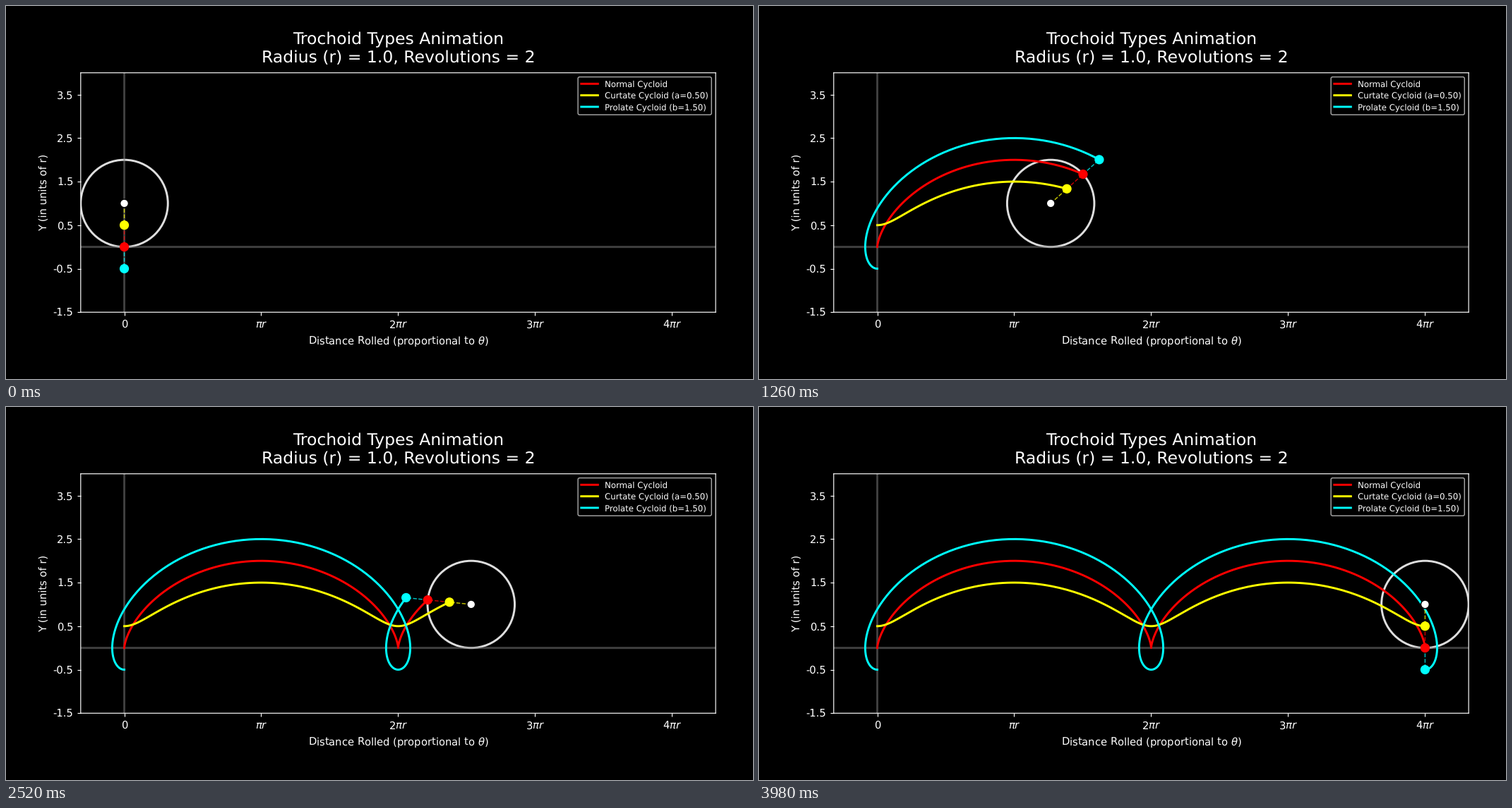
Write a matplotlib script that moves like this. It is 1058 by 529 pixels and loops after 4 s.

```python
import numpy as np
import matplotlib.pyplot as plt
from matplotlib.animation import FuncAnimation
from matplotlib.patches import Circle

FRAMES, INTERVAL = 200, 20
R, TURNS = 1.0, 2
CURTATE, PROLATE = 0.5, 1.5
END = 2 * np.pi * R * TURNS
X_MIN, X_MAX, Y_MIN, Y_MAX = -R, END + R, -1.5, 4.0
FIG_W, FIG_H, DPI = 10, 5, 105.8

plt.style.use("dark_background")
# Smooth, unsnapped lines and unhinted text
plt.rcParams.update({"path.snap": False, "text.hinting": "none"})
fig = plt.figure(figsize=(FIG_W, FIG_H), dpi=DPI)

# Equal scale on both axes, centred vertically
width = 0.85
height = width * FIG_W / FIG_H * (Y_MAX - Y_MIN) / (X_MAX - X_MIN)
ax = fig.add_axes([0.1, 0.5 - height / 2, width, height])
ax.set_xlim(X_MIN, X_MAX)
ax.set_ylim(Y_MIN, Y_MAX)

ax.set_title(f"Trochoid Types Animation\nRadius (r) = {R}, Revolutions = {TURNS}",
             fontsize=16, pad=10)
ax.set_xlabel(r"Distance Rolled (proportional to $\theta$)")
ax.set_ylabel("Y (in units of r)")
ax.set_xticks(np.arange(5) * np.pi * R,
              ["0", r"$\pi r$", r"$2\pi r$", r"$3\pi r$", r"$4\pi r$"])
y_ticks = np.arange(Y_MIN, Y_MAX, 1)
ax.set_yticks(y_ticks, [f"{y:.1f}" for y in y_ticks])

ax.axhline(0, color="gray", lw=2, alpha=0.5)
ax.axvline(0, color="gray", lw=2, alpha=0.5)

wheel = Circle((0, R), R, fill=False, ec="0.87", lw=2)
ax.add_patch(wheel)

theta = np.linspace(0, 2 * np.pi * TURNS, FRAMES)


def trochoid(arm):
    return R * theta - arm * np.sin(theta), R - arm * np.cos(theta)


KINDS = [
    (R, "red", "Normal Cycloid"),
    (CURTATE, "yellow", f"Curtate Cycloid (a={CURTATE:.2f})"),
    (PROLATE, "cyan", f"Prolate Cycloid (b={PROLATE:.2f})"),
]
paths = [trochoid(arm) for arm, _, _ in KINDS]
trails = [ax.plot([], [], color=c, lw=2, label=name)[0] for _, c, name in KINDS]

# Spokes run outwards: centre, curtate, normal, prolate
stops = np.array([trochoid(arm) for arm in (0, CURTATE, R, PROLATE)])
spokes = [ax.plot([], [], "--", color=c, lw=1, alpha=0.75)[0]
          for c in ("yellow", "red", "cyan")]
dots = ax.scatter(*stops[:, :, 0].T, s=64, linewidths=1, zorder=3,
                  c=["white", "yellow", "red", "cyan"],
                  edgecolors=["black", "yellow", "red", "cyan"])

legend = ax.legend(loc="upper right", fontsize=8, labelspacing=0.4)
legend.get_frame().set_snap(False)


def update(i):
    wheel.center = (R * theta[i], R)
    for (px, py), trail in zip(paths, trails):
        trail.set_data(px[:i + 1], py[:i + 1])
    points = stops[:, :, i]
    dots.set_offsets(points)
    for inner, outer, spoke in zip(points, points[1:], spokes):
        spoke.set_data(*zip(inner, outer))
    return [wheel, *trails, *spokes, dots]


anim = FuncAnimation(fig, update, frames=FRAMES, interval=INTERVAL,
                     repeat=True, repeat_delay=0, blit=False)
plt.show()
```
